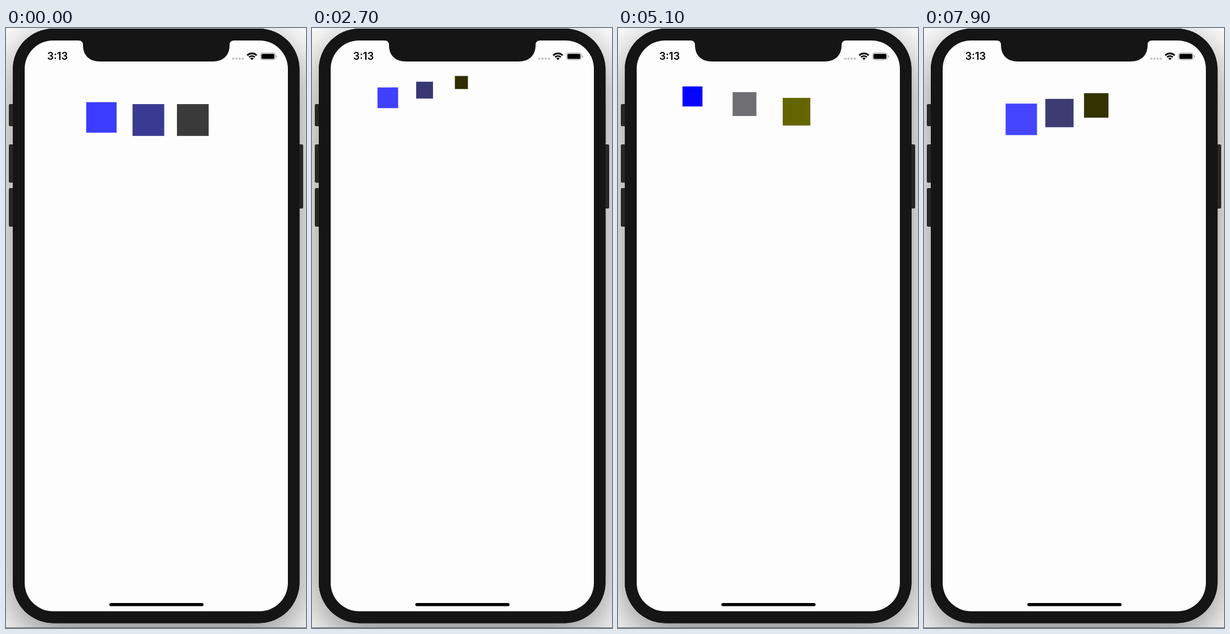
Animation, 530 px wide and 1057 px high, one loop 8000 ms. Source, as an HTML page with a canvas:

```html
<!DOCTYPE html>
<html lang="en">
<head>
<meta charset="utf-8">
<title>Staggered squares</title>
<style>
  html, body { margin: 0; width: 530px; height: 1057px; overflow: hidden; background: #fff; }
  canvas { display: block; }
</style>
</head>
<body>
<canvas id="stage" width="530" height="1057"></canvas>
<script>
const WIDTH = 530, HEIGHT = 1057;
const LOOP = 8000, STEP = 100;
const SCREEN = { x: 33, y: 22, w: 465, h: 1005.5 };
const POINT = 1.1208;      // pixels per screen point
const HEAD_START = 0.135;  // seconds already run when the loop begins
const SQUARES = [
  { left: 100, delay: 0, blue: 255 },
  { left: 170, delay: 0.4, blue: 115 },
  { left: 240, delay: 0.8, blue: 0 }
];

const ctx = document.getElementById('stage').getContext('2d');

function roundBox(c, x, y, w, h, r, color) {
  c.fillStyle = color;
  c.beginPath();
  c.roundRect(x, y, w, h, r);
  c.fill();
}

function drawBackdrop(c) {
  c.fillStyle = '#fff';
  c.fillRect(0, 0, WIDTH, HEIGHT);
  c.save();
  c.shadowColor = 'rgba(0,0,0,0.5)';
  c.shadowBlur = 80;
  c.shadowOffsetY = 22;
  roundBox(c, 12, 1, 506.5, 1047.5, 72, '#151515');
  c.restore();
  c.fillStyle = '#555';
  c.fillRect(0, 1056, WIDTH, 1);
}

function drawBody(c) {
  for (const [y, h] of [[134, 39], [205, 67.5], [282, 68]]) {
    roundBox(c, 5, y, 10, h, 2.5, '#272727');
  }
  roundBox(c, 515, 205, 10, 113, 2.5, '#272727');
  roundBox(c, 12, 1, 506.5, 1047.5, 72, '#151515');
  roundBox(c, SCREEN.x, SCREEN.y, SCREEN.w, SCREEN.h, 50, '#fdfdfd');
}

function drawNotch(c) {
  const left = 136, right = 395, top = SCREEN.y, bottom = 59;
  c.fillStyle = '#151515';
  c.beginPath();
  c.moveTo(left - 8, top - 1);
  c.lineTo(left - 8, top);
  c.quadraticCurveTo(left, top, left, top + 8);
  c.bezierCurveTo(left, top + 26, left + 11, bottom, left + 30, bottom);
  c.lineTo(right - 30, bottom);
  c.bezierCurveTo(right - 11, bottom, right, top + 26, right, top + 8);
  c.quadraticCurveTo(right, top, right + 8, top);
  c.lineTo(right + 8, top - 1);
  c.fill();
}

function drawWifi(c, x, y) {
  const from = -Math.PI * 0.75, to = -Math.PI * 0.25;
  c.fillStyle = '#000';
  for (const [inner, outer] of [[0, 4.3], [6, 8.6], [10.3, 13.2]]) {
    c.beginPath();
    c.arc(x, y, outer, from, to);
    c.arc(x, y, inner, to, from, true);
    c.fill();
  }
}

function drawStatusBar(c) {
  c.fillStyle = '#000';
  c.font = '600 18px Inter, sans-serif';
  c.textAlign = 'center';
  c.fillText('3:13', 91, 56);

  for (let i = 0; i < 4; i++) {
    roundBox(c, 399.5 + i * 5.6, 52, 4.2, 4.2, 2.1, '#c6c6c6');
  }
  drawWifi(c, 434.5, 56.5);

  c.strokeStyle = '#a3a3a3';
  c.lineWidth = 1;
  c.beginPath();
  c.roundRect(449.5, 43.8, 26.5, 12.2, 3.6);
  c.stroke();
  roundBox(c, 451.2, 45.4, 23, 9, 2, '#000');
  roundBox(c, 477.3, 48, 1.6, 4.2, [0, 1.5, 1.5, 0], '#a3a3a3');
}

function buildPhone() {
  const layer = document.createElement('canvas');
  layer.width = WIDTH;
  layer.height = HEIGHT;
  const c = layer.getContext('2d');
  drawBackdrop(c);
  drawBody(c);
  drawNotch(c);
  drawStatusBar(c);
  roundBox(c, 182.5, 1013, 166.5, 5.6, 2.8, '#000');
  return layer;
}

// 0 at rest, 1 at the far end; two seconds each way
function pingPong(seconds) {
  const phase = seconds % 4;
  return phase < 2 ? phase / 2 : 2 - phase / 2;
}

function drawSquare({ left, delay, blue }, seconds) {
  const local = Math.max(0, seconds + HEAD_START - delay);
  const travel = pingPong(local);
  const size = 50 - 30 * travel;
  const shift = 45 * travel;
  const tint = 22.7 * (local % 5);
  ctx.fillStyle = `rgb(${tint}, ${tint}, ${blue})`;
  ctx.fillRect(
    SCREEN.x + (left - shift) * POINT,
    SCREEN.y + (100 - shift) * POINT,
    size * POINT,
    size * POINT
  );
}

const phone = buildPhone();

function render(now) {
  const seconds = Math.floor((now % LOOP) / STEP) * STEP / 1000;
  ctx.globalAlpha = 1;
  ctx.drawImage(phone, 0, 0);
  ctx.globalAlpha = Math.min(1, 0.77 + seconds * 2.5);
  SQUARES.forEach(square => drawSquare(square, seconds));
}

const start = performance.now();
function tick() {
  render(performance.now() - start);
  requestAnimationFrame(tick);
}
tick();
</script>
</body>
</html>
```
